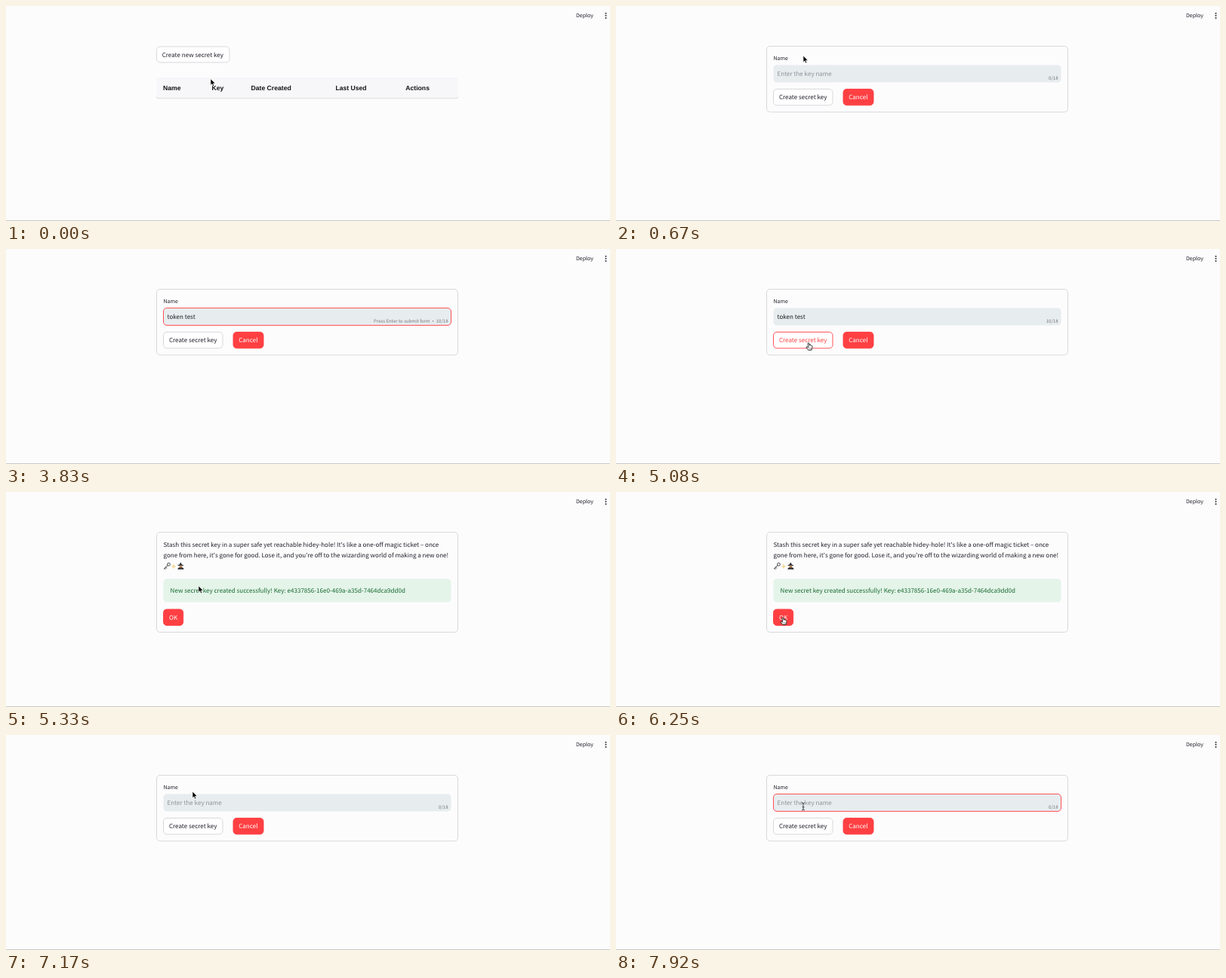
These frames come from a looping animation (800 by 286 pixels, 8 s). An HTML page:

```html
<!DOCTYPE html>
<html lang="en">
<head>
<meta charset="utf-8">
<title>Secret key manager</title>
<style>
html, body { margin: 0; width: 100%; height: 100%; overflow: hidden; background: #fdfcfd; }
svg { display: block; width: 800px; height: 286px; }
text { font: 8.05px "Noto Sans CJK SC", "Noto Sans CJK JP", "Noto Sans", sans-serif; fill: #1f212b; white-space: pre; text-rendering: geometricPrecision; }
.label { font-size: 7.05px; }
.hint { font-size: 6.04px; fill: #73767d; text-anchor: end; }
.cell, .head { font: 8.64px "Liberation Sans", Arial, sans-serif; fill: #222; }
.head { font-weight: bold; fill: #151515; }
</style>
</head>
<body>
<svg id="stage" viewBox="0 0 800 286"></svg>
<script>
const stage = document.getElementById('stage');
const LOOP = 8000, STEP = 1000 / 12;
const RED = '#ff4043', LINE = '#d3d4d9';
const TYPED = 'token test';
const keyTimes = [1420, 1590, 1750, 1920, 2080, 2330, 2750, 3000, 3250, 3580];
const caretTimes = [[1250, 3830], [4420, 4830], [7420, 7920]];

// Pointer path: time, x, y
const path = [
  [80, 271, 97], [420, 248, 67], [840, 248, 66], [1250, 250, 92],
  [3920, 250, 92], [4330, 258, 122], [4670, 255, 125], [5670, 255, 125],
  [6080, 221, 167], [6330, 221, 167], [6580, 240, 126], [6830, 247, 68],
  [7080, 247, 68], [7330, 247, 90], [7750, 248, 95], [8100, 248, 95]
];

const newKey = [199.5, 54, 96.5, 21, 'Create new secret key', 7.2];
const create = [208.5, 110.5, 78.5, 21.5, 'Create secret key', 7.4];
const cancel = [301, 110.5, 40, 21.5, 'Cancel', 7.2];
const ok = [208.5, 156, 26.2, 21.5, 'OK', 7.5];
const field = [208.5, 78.5, 381, 23];
const row = [199.5, 122.5, 399, 30];

const between = (t, a, b) => t >= a && t < b;
const inside = ([x, y, w, h], p) => between(p.x, x, x + w) && between(p.y, y, y + h);
const text = (x, y, s, cls = '', attrs = '') => `<text x="${x}" y="${y}" class="${cls}" ${attrs}>${s}</text>`;
const rect = ([x, y, w, h], fill, stroke = 'none', r = 4.5) =>
  `<rect x="${x}" y="${y}" width="${w}" height="${h}" rx="${r}" fill="${fill}" stroke="${stroke}" stroke-width=".9"/>`;
const dot = (x, y, r, fill) => `<circle cx="${x}" cy="${y}" r="${r}" fill="${fill}"/>`;
const shape = (d, fill, stroke = 'none', w = .7) =>
  `<path d="${d}" fill="${fill}" stroke="${stroke}" stroke-width="${w}" stroke-linejoin="round" stroke-linecap="round"/>`;

function button(box, hover, primary) {
  const [x, y, , h, label, pad] = box;
  const ink = primary ? '#fff' : hover ? RED : '#1f212b';
  return rect(box, primary ? RED : '#fff', primary || hover ? RED : LINE) +
    text(x + pad, y + h / 2 + 3, label, '', `style="fill:${ink}"`);
}

function pointerAt(t) {
  let i = path.findIndex(k => k[0] > t);
  if (i < 1) return { x: path[0][1], y: path[0][2] };
  const [t0, x0, y0] = path[i - 1], [t1, x1, y1] = path[i];
  const u = (t - t0) / (t1 - t0), e = u * u * (3 - 2 * u);
  return { x: x0 + (x1 - x0) * e, y: y0 + (y1 - y0) * e };
}

const cursors = {
  arrow: shape('M0 0V8.4L1.9 6.6 3.2 9.6 4.7 9 3.4 6.1H6Z', '#000', '#fff', .6),
  beam: shape('M-1.6-4.8Q0-4.8 0-3.6Q0-4.8 1.6-4.8M0-3.6V3.8M-1.6 5Q0 5 0 3.8Q0 5 1.6 5M-1 .9H1', 'none', '#222', .8),
  hand: shape('M-.8.3Q0-.7.8.3L1.2 3.3Q2-.1+2.2 3Q3.1 2.4 3.6 3.5Q4.6 3 5 4.2L4.8 7.2 3.9 9.6H-.2L-2.8 6Q-3.2 4.8-2 4.9L-.5 6Z', '#fff', '#111', .8) +
    shape('M1 6.6V8.4M2.2 6.6V8.4M3.4 6.6V8.4', 'none', '#333', .4)
};

function table(filled, p) {
  const xs = filled ? [208, 276.3, 384, 472.3, 545.7] : [208, 272.5, 324.5, 436.4, 529.3];
  const cells = (labels, y, cls) => labels.map((s, i) => text(xs[i], y, s, cls)).join('');
  let out = button(newKey, inside(newKey, p)) + rect([199.5, 95, 399, 28], '#f7f6f8', 'none', 2);
  if (filled) {
    out += rect(row, inside(row, p) ? '#e9e9e9' : '#fdfcfd', 'none', 1) +
      cells(['token test', 'e433xxxxxxxdd0d', '2023-12-20', 'Never'], 140.3, 'cell') +
      shape('M548.6 135.4H552.9L552.5 140H549ZM548.2 134.6H553.3M550 134H551.5', '#b0b0b0', '#999', .7) +
      shape('M550 136.3V139M551.5 136.3V139', 'none', '#ddd', .4);
  }
  return out + shape(filled ? 'M200 152.5H598' : 'M199.5 121Q199.5 122.8 201 122.8H597Q598.5 122.8 598.5 121', 'none', '#d6d6d9', .8) +
    cells(['Name', 'Key', 'Date Created', 'Last Used', 'Actions'], 111.9, 'head');
}

function form(t, p) {
  const count = t < 7000 ? keyTimes.filter(k => k <= t).length : 0;
  const focused = between(t, 1250, 5000) || t > 7420;
  const left = 585.5 - (count > 9 ? 15.8 : 12.4);
  return rect([199.5, 53.5, 399, 87.5], 'none', LINE) +
    text(208.5, 72.2, 'Name', 'label') +
    rect(field, '#e7ecef', focused ? RED : 'none') +
    (count ? text(213.5, 92.9, TYPED.slice(0, count), '', 'id="typed"')
           : text(213.5, 92.9, 'Enter the key name', '', 'style="fill:#8d9299"')) +
    text(585.5, 98, count + '/18', 'hint') +
    (count && focused ? text(left - 8, 98, 'Press Enter to submit form', 'hint') + dot(left - 4.2, 96, .8, '#73767d') : '') +
    button(create, inside(create, p) && t > 3920) + button(cancel, false, true);
}

function success() {
  return rect([199.5, 53.5, 399, 133], 'none', LINE) +
    text(208.5, 72.7, "Stash this secret key in a super safe yet reachable hidey-hole! It's like a one-off magic ticket – once") +
    text(208.5, 87.1, "gone from here, it's gone for good. Lose it, and you're off to the wizarding world of making a new one!") +
    shape('M214 97.7L209.3 102.2M210.2 101.3L211.4 102.6M211.5 100L212.6 101.2', 'none', '#333', 1) +
    `<circle cx="215.5" cy="96.3" r="1.9" fill="none" stroke="#333" stroke-width=".9"/>` +
    shape('M222 95L222.8 98 225.6 99 222.8 100 222 103 221.2 100 218.8 99 221.2 98Z', '#f3d58a') +
    shape('M227 97.3L229.7 96.6 231.2 93.6 233.2 96.7 235.7 97.5 234 98.2H229Z', '#2c2d38') +
    shape('M227.3 103Q227.8 100 231.5 100T235.6 103Z', '#34323a') +
    dot(231.4, 99.2, 1.8, '#d49a62') + shape('M229.7 99.6H233.2L231.5 102.5Z', '#7a5237') +
    rect([208.5, 115.5, 381, 31], '#e4f4e9') +
    text(217.6, 134.2, 'New secret key created successfully! Key: e4337856-16e0-469a-a35d-7464dca9dd0d', '', 'style="fill:#17692f"') +
    button(ok, false, true);
}

function draw(t) {
  const p = pointerAt(t);
  const onTable = t < 670 || between(t, 6420, 7000);
  const onSuccess = between(t, 5250, 6420);
  const targets = onTable ? [newKey] : onSuccess ? [ok] : [create, cancel];
  const cursor = targets.some(b => inside(b, p)) ? 'hand' : !onTable && !onSuccess && inside(field, p) ? 'beam' : 'arrow';

  stage.innerHTML = rect([0, 0, 800, 286], '#fdfcfd', 'none', 0) +
    rect([0, 285, 800, 1], '#c9c9ca', 'none', 0) +
    text(755, 15.4, 'Deploy', 'label') +
    [9.7, 12.8, 15.9].map(y => dot(794.5, y, 1, '#2b2d37')).join('') +
    (onTable ? table(t > 670, p) : onSuccess ? success() : form(t, p)) +
    '<path id="caret" stroke="#222" stroke-width=".8"/>' +
    (between(t, 1420, 3920) ? '' : `<g transform="translate(${p.x} ${p.y})">${cursors[cursor]}</g>`);

  if (caretTimes.some(([a, b]) => between(t, a, b))) {
    const typed = document.getElementById('typed');
    const x = 213.7 + (typed ? typed.getComputedTextLength() : 0);
    document.getElementById('caret').setAttribute('d', `M${x} 84.3V95.5`);
  }
}

let last = -1;
function tick() {
  const step = Math.floor((performance.now() % LOOP + 5) / STEP) % 96;
  if (step !== last) draw((last = step) * STEP + 10);
  requestAnimationFrame(tick);
}
tick();
</script>
</body>
</html>
```
